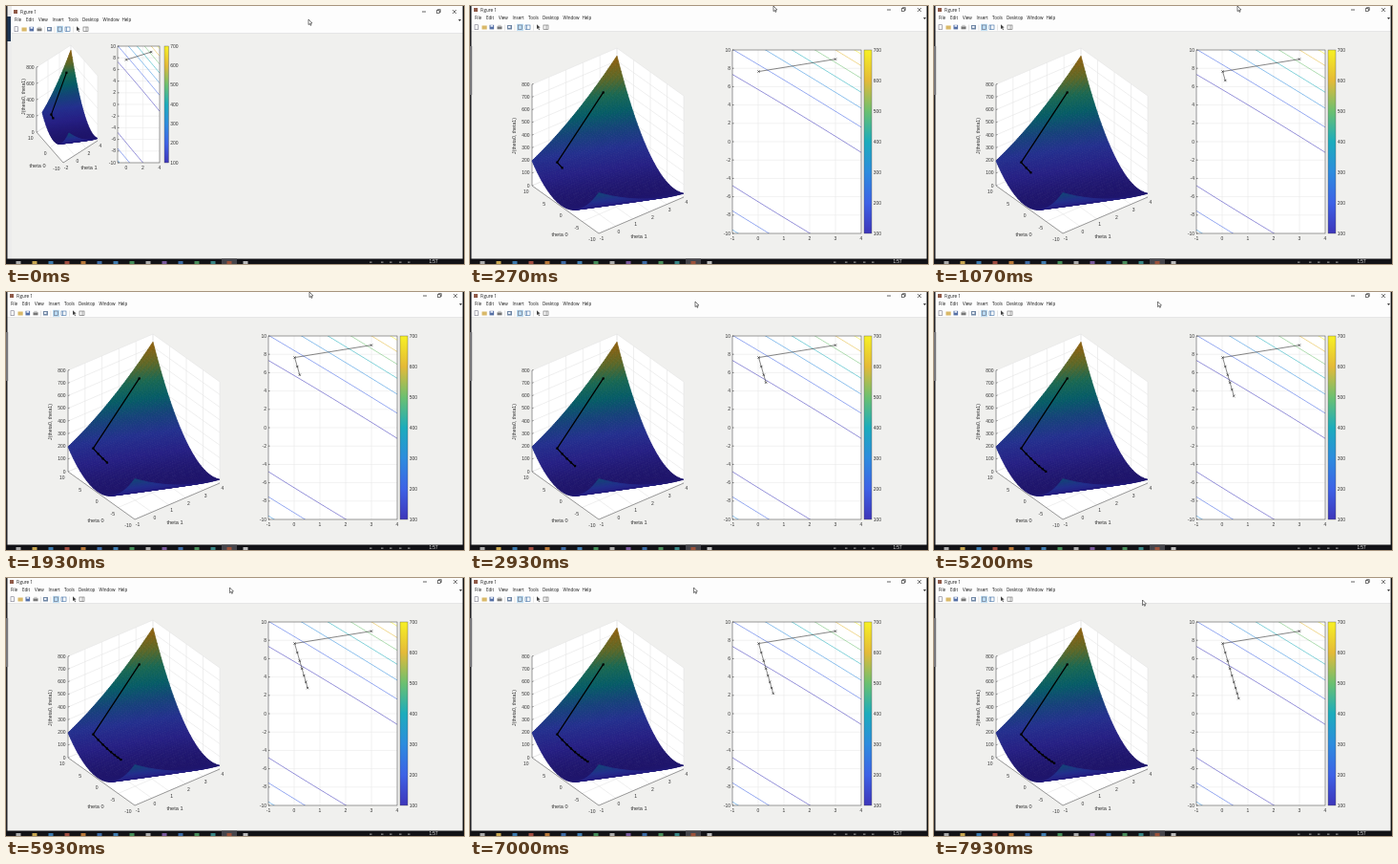
Recreate the animation shown at these times as an HTML page with a canvas. Size 480 by 270 pixels, loop 8000 ms.

```html
<!DOCTYPE html>
<html>
<head>
<meta charset="utf-8">
<style>
html, body { margin: 0; width: 100%; height: 100%; overflow: hidden; background: #f0f0ee; }
canvas { display: block; }
</style>
</head>
<body>
<canvas id="stage" width="480" height="270"></canvas>
<script>
const ctx = document.getElementById('stage').getContext('2d');
const LOOP = 8000, RESIZE = 70;
const stepTimes = [730, 1670, 2600, 3530, 4470, 5470, 6330, 7270];
const cursorKeys = [[0, 317, 14], [70, 317, 13], [200, 318, 0], [2130, 318, 0], [2800, 236, 10],
  [3270, 236, 10], [3530, 234.5, 10], [7600, 234.5, 10], [7930, 218.5, 23], [8000, 218.5, 23]];

// left / front / right: floor corners of the 3D box; plot: x, y, w, h
const small = {
  left: [32, 132], front: [60, 164], right: [96, 141], height: 68, xMin: -2,
  xTicks: [-2, 0, 2, 4], yTicks: [10, 0, -10], zStep: 200,
  plot: [117, 42, 44, 122], plotTicks: [0, 2, 4], bar: [166, 4.5],
  zTitle: [19, 95], yTitle: [33, 167], xTitle: [87, 169], line: 1.1
};
const large = {
  left: [65, 188], front: [135, 238], right: [224, 200], height: 106, xMin: -1,
  xTicks: [-1, 0, 1, 2, 3, 4], yTicks: [10, 5, 0, -5, -10], zStep: 100,
  plot: [275, 46, 135, 192], plotTicks: [-1, 0, 1, 2, 3, 4], bar: [413, 8],
  zTitle: [47, 136], yTitle: [94, 239], xTitle: [177, 241], line: 1.3
};

const parula = [[62, 54, 186], [62, 98, 230], [45, 140, 222], [28, 172, 188], [108, 192, 112], [228, 186, 56], [247, 240, 36]];
const shade = [[30, 20, 104], [38, 32, 132], [36, 48, 142], [22, 66, 122], [6, 92, 102], [26, 104, 82], [92, 104, 40], [136, 98, 20], [144, 98, 16]];

function ramp(stops, u) {
  const p = Math.max(0, Math.min(1, u)) * (stops.length - 1);
  const i = Math.min(stops.length - 2, Math.floor(p));
  return `rgb(${stops[i].map((v, k) => Math.round(v + (stops[i + 1][k] - v) * (p - i)))})`;
}

// Cost is a tilted parabolic valley over (theta1, theta0) = (x, y)
const valley = x => 1.27 - 1.7 * (x + 1);
const base = x => 7.5 + 0.4 * (x - 1.5) ** 2;
const cost = (x, y) => 2.45 * (y - valley(x)) ** 2 + base(x);

function descent(i) {
  if (i === 0) return [3, 9];
  const s = (1 - 0.92 ** (i - 1)) / 0.08;
  return [0.02 + 0.102 * s, 7.65 - 0.985 * s];
}

function rect(x, y, w, h, color) {
  ctx.fillStyle = color;
  ctx.fillRect(x, y, w, h);
}

function box(x, y, w, h, color, width = 0.6) {
  ctx.strokeStyle = color;
  ctx.lineWidth = width;
  ctx.strokeRect(x, y, w, h);
}

function trace(points, closed) {
  ctx.beginPath();
  points.forEach(p => ctx.lineTo(p[0], p[1]));
  if (closed) ctx.closePath();
}

function line(points, color, width = 0.6) {
  trace(points);
  ctx.strokeStyle = color;
  ctx.lineWidth = width;
  ctx.stroke();
}

function fill(points, color, edge, width) {
  trace(points, true);
  ctx.fillStyle = color;
  ctx.fill();
  if (!edge) return;
  ctx.strokeStyle = edge;
  ctx.lineWidth = width;
  ctx.stroke();
}

function text(str, x, y, align = 'center', size = 5, color = '#333', font = '"Liberation Sans", Arial, sans-serif') {
  ctx.font = `${size}px ${font}`;
  ctx.textAlign = align;
  ctx.textBaseline = 'middle';
  ctx.fillStyle = color;
  ctx.fillText(str, x, y);
}

function drawWindow(dx, dy) {
  rect(0, 0, 480, 270, '#f0f0ee');
  rect(0, 0, 480, 26.5 + dy, '#fdfdfd');
  rect(0, 26 + dy, 480, 0.6, '#dcdcdc');

  ctx.save();
  ctx.translate(dx, dy);
  rect(4, 2, 4, 4, '#8f5a48');
  const ui = (s, x, y) => text(s, x, y, 'left', 4.5, '#111', '"Open Sans", Inter, sans-serif');
  ui('Figure 1', 11, 4.5);
  [['File', 5], ['Edit', 17], ['View', 30], ['Insert', 44.5], ['Tools', 61], ['Desktop', 76], ['Window', 97.5], ['Help', 117.5]]
    .forEach(([s, x]) => ui(s, x, 13.2));
  drawToolbar();
  ctx.restore();

  ctx.save();
  ctx.translate(dx ? -1 : 0, dy);
  line([[437, 4], [441, 4]], '#222', 0.7);
  box(452.5, 2.7, 2.8, 2.8, '#222');
  line([[453.5, 2.5], [453.5, 1.6], [456.3, 1.6], [456.3, 4.5], [455.5, 4.5]], '#222');
  line([[469, 2], [473, 6]], '#222');
  line([[473, 2], [469, 6]], '#222');
  fill([[475, 12], [478, 12], [476.5, 14]], '#333');
  ctx.restore();

  // Desktop showing past the window edges
  if (dx) {
    rect(0, 0, 6, 265, '#ececec');
    rect(0, 11, 5, 26, '#1d3452');
  }
  rect(0, 0, 1.5, 265, '#222226');
  if (!dx) rect(0, 42, 2.2, 51, '#77777b');
  rect(478.6, 0, 1.4, 265, '#111');
}

function drawToolbar() {
  const divider = x => rect(x, 19.5, 0.5, 6, '#ccc');
  box(5, 19.7, 3.6, 5, '#778');
  rect(12.5, 20.5, 5.2, 4, '#d9b868');
  rect(20.5, 19.8, 4.6, 4.6, '#5670a5');
  rect(21.5, 20, 2.6, 1.8, '#dfe7f5');
  rect(28.5, 21.3, 5, 3, '#777');
  rect(29.3, 19.8, 3.4, 1.6, '#ccc');
  divider(36);
  rect(39, 20, 5, 4.5, '#7187a5');
  rect(40, 21, 2.5, 2, '#e7edf6');
  divider(46.7);
  rect(49, 18.8, 7, 7, '#b9dcf5');
  box(50.5, 20, 4, 4.6, '#667');
  box(58, 20, 5, 4.6, '#3d6ea5');
  line([[59.5, 20], [59.5, 24.6]], '#3d6ea5');
  divider(66);
  fill([[70, 19.3], [70, 24.3], [71.2, 23], [72.2, 25.2], [72.9, 24.8], [72, 22.8], [73.6, 22.6]], '#444');
  box(77, 20, 5, 4.6, '#666');
  line([[80, 20], [80, 24.6]], '#666');
}

function drawTaskbar() {
  rect(0, 264.5, 480, 5.5, '#121216');
  rect(226, 264.5, 16, 5.5, '#45454b');
  const colors = ['#aaa', '#c8a650', '#3a78ac', '#a04c40', '#b87838', '#3d6aa4', '#3f7cb0', '#438c58',
    '#aaa', '#78589c', '#3a6aa4', '#488c5a', '#378484', '#9c523a', '#bbb'];
  colors.forEach((c, i) => rect(10.5 + i * 17, 267, 5, 3, c));
  [381, 393, 402, 412, 421].forEach(x => rect(x, 267.5, 2.5, 1.3, '#888'));
  text('1:57', 448, 267.3, 'center', 4.6, '#eee');
}

function drawSurface(v, count) {
  const [lx, ly] = v.left, [fx, fy] = v.front, [rx, ry] = v.right;
  const project = (x, y, z) => {
    const a = (x - v.xMin) / (4 - v.xMin), b = (10 - y) / 20;
    return [lx + a * (rx - fx) + b * (fx - lx), ly + a * (ry - fy) + b * (fy - ly) - z / 800 * v.height];
  };
  const x0 = v.xMin, grid = '#e4e4e4';
  fill([project(x0, 10, 0), project(x0, 10, 800), project(4, 10, 800), project(4, -10, 800),
    project(4, -10, 0), project(x0, -10, 0)], '#fff');
  for (let z = 0; z <= 800; z += v.zStep) {
    line([project(x0, 10, z), project(4, 10, z), project(4, -10, z)], grid);
    const p = project(x0, 10, z);
    line([p, [p[0] + 1.5, p[1] - 0.5]], '#333');
    text(z, p[0] - 2.5, p[1] + 0.3, 'right');
  }
  v.xTicks.forEach(x => {
    line([project(x, -10, 0), project(x, 10, 0), project(x, 10, 800)], grid);
    const p = project(x, -10, 0);
    text(x, p[0] + 3, p[1] + 6);
  });
  v.yTicks.forEach(y => {
    line([project(x0, y, 0), project(4, y, 0), project(4, y, 800)], grid);
    const p = project(x0, y, 0);
    text(y, p[0] - 3.5, p[1] + 7, 'right');
  });
  line([project(x0, 10, 800), project(x0, 10, 0), project(x0, -10, 0), project(4, -10, 0)], '#444', 0.5);

  // Patches from back to front, edged in their own colour to close seams
  const N = 50, X = i => 4 - 5 * i / N, Y = j => 10 - 20 * j / N;
  const at = (i, j) => project(X(i), Y(j), cost(X(i), Y(j)));
  for (let j = 0; j < N; j++) for (let i = 0; i < N; i++) {
    const color = ramp(shade, cost(X(i + 0.5), Y(j + 0.5)) / 800);
    fill([at(i, j), at(i + 1, j), at(i + 1, j + 1), at(i, j + 1)], color, color, 0.8);
  }

  const path = [];
  for (let i = 0; i <= count; i++) {
    const [x, y] = descent(i);
    path.push(project(x, y, cost(x, y)));
  }
  line(path, '#000', v.line);
  path.forEach(([x, y]) => rect(x - 1.1, y - 1.1, 2.2, 2.2, '#000'));

  text('theta 0', ...v.yTitle, 'center', 5.6);
  text('theta 1', ...v.xTitle, 'center', 5.6);
  ctx.save();
  ctx.translate(...v.zTitle);
  ctx.rotate(-Math.PI / 2);
  text('J(theta0, theta1)', 0, 0, 'center', 5.2);
  ctx.restore();
}

function drawContour(v, count) {
  const [px, py, w, h] = v.plot;
  const X = x => px + (x + 1) / 5 * w, Y = y => py + (10 - y) / 20 * h;
  rect(px, py, w, h, '#fff');
  v.plotTicks.forEach(x => {
    line([[X(x), py], [X(x), py + h]], '#e8e8e8');
    text(x, X(x), py + h + 5.5);
  });
  for (let y = -10; y <= 10; y += 2) {
    line([[px, Y(y)], [px + w, Y(y)]], '#e8e8e8');
    line([[px, Y(y)], [px + 1.5, Y(y)]], '#333');
    text(y, px - 2, Y(y) + 0.3, 'right');
  }

  ctx.save();
  ctx.beginPath();
  ctx.rect(px, py, w, h);
  ctx.clip();
  for (let level = 100; level <= 700; level += 100) {
    for (const side of [1, -1]) {
      const curve = [];
      for (let x = -1; x <= 4.01; x += 0.25)
        curve.push([X(x), Y(valley(x) + side * Math.sqrt((level - base(x)) / 2.45))]);
      line(curve, ramp(parula, (level - 100) / 600), 0.55);
    }
  }
  ctx.restore();
  box(px, py, w, h, '#444', 0.5);

  const path = [];
  for (let i = 0; i <= count; i++) {
    const [x, y] = descent(i);
    path.push([X(x), Y(y)]);
  }
  line(path, '#333', 0.6);
  path.forEach(([x, y]) => {
    line([[x - 1.2, y - 1.2], [x + 1.2, y + 1.2]], '#222');
    line([[x + 1.2, y - 1.2], [x - 1.2, y + 1.2]], '#222');
  });

  const [bx, bw] = v.bar;
  const g = ctx.createLinearGradient(0, py + h, 0, py);
  parula.forEach((c, i) => g.addColorStop(i / 6, `rgb(${c})`));
  rect(bx, py, bw, h, g);
  box(bx, py, bw, h, '#555', 0.4);
  for (let i = 0; i <= 6; i++) text(700 - i * 100, bx + bw + 1.7, py + i * h / 6 + 0.3, 'left');
}

function drawCursor(t) {
  const i = cursorKeys.findIndex((k, n) => n > 0 && t <= k[0]);
  const [t0, x0, y0] = cursorKeys[i - 1], [t1, x1, y1] = cursorKeys[i];
  const u = (t - t0) / (t1 - t0), s = u * u * (3 - 2 * u);
  ctx.save();
  ctx.translate(x0 + (x1 - x0) * s, y0 + (y1 - y0) * s);
  fill([[0, 0], [0, 5.6], [1.3, 4.4], [2.2, 6.4], [3, 6], [2.2, 4.1], [3.9, 4]], '#fff', '#222', 0.6);
  ctx.restore();
}

function frame() {
  const t = performance.now() % LOOP;
  const n = 1 + stepTimes.filter(s => t >= s).length;
  const v = t < RESIZE ? small : large;
  if (v === small) drawWindow(4, 2);
  else drawWindow(0, 0);
  drawSurface(v, n + 1);
  drawContour(v, n);
  drawTaskbar();
  drawCursor(t);
  requestAnimationFrame(frame);
}
frame();
</script>
</body>
</html>
```
